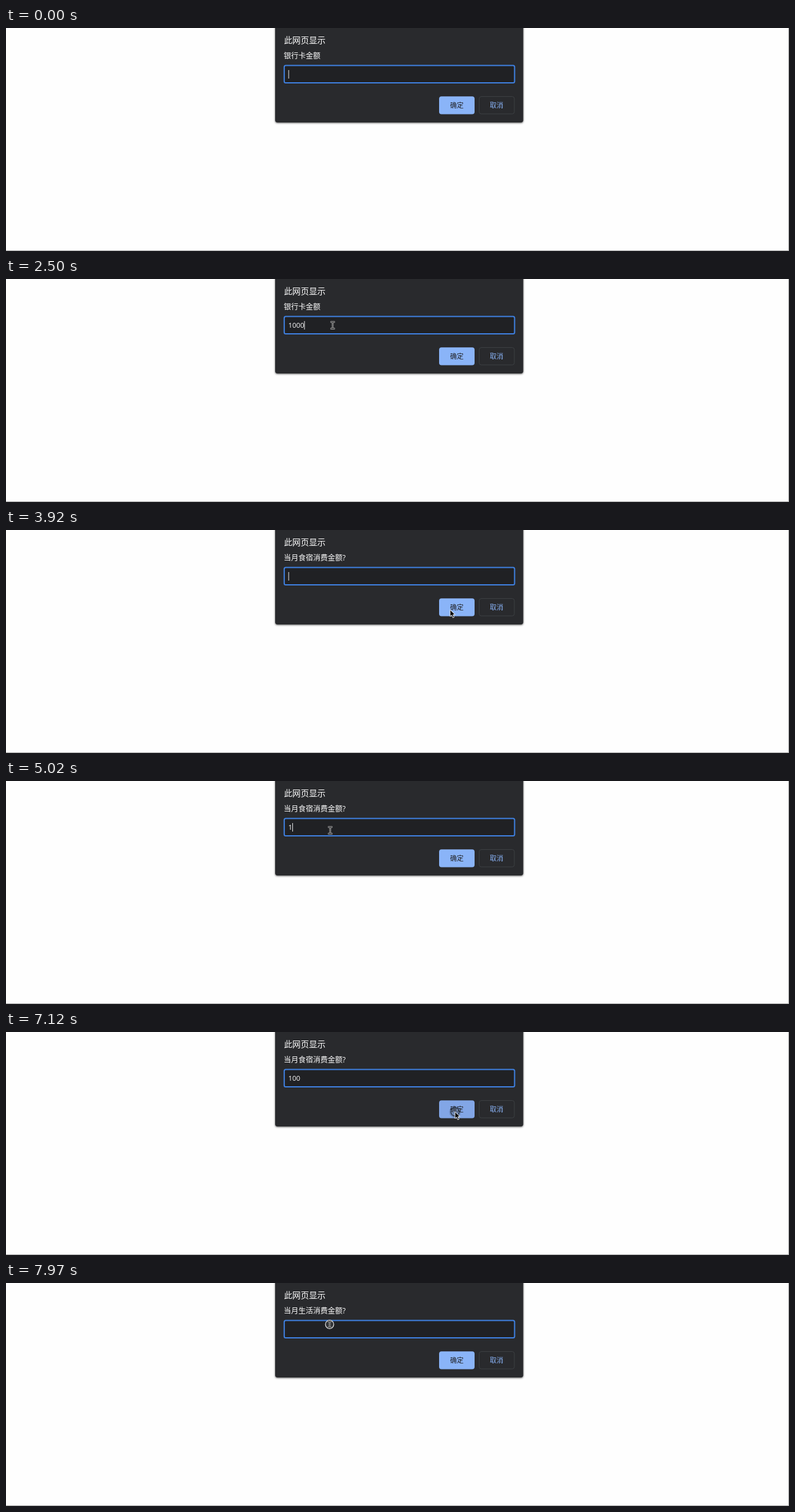
An HTML page that plays this animation: 1280x366 px, repeating every 8 s.

```html
<!DOCTYPE html>
<html lang="zh-CN">
<head>
<meta charset="utf-8">
<title>Prompt dialog</title>
<style>
html, body { margin: 0; width: 100%; height: 100%; overflow: hidden; background: #fefefe; }
#stage { position: relative; width: 1280px; height: 366px; overflow: hidden; }
#edge { position: absolute; inset: 0; border: solid #a3a3a3; border-width: 0 1px 1px 0; }
svg { position: absolute; left: 0; top: 0; width: 1280px; height: 366px; }
#dialog { transform-origin: 642.75px 0; }
text { font-family: "Open Sans", "Noto Sans CJK SC", "Noto Sans CJK", sans-serif; fill: #fff; font-size: 12px; white-space: pre; }
.btn { font-size: 11px; text-anchor: middle; }
#value { font-size: 11.3px; }
</style>
</head>
<body>
<div id="stage">
  <div id="edge"></div>
  <svg id="dialog" viewBox="0 0 1280 366">
    <rect x="440" y="-20" width="405.5" height="175" rx="4" fill="#292a2d" style="filter:drop-shadow(0 1px 1.5px rgba(0,0,0,.65))"/>
    <text x="454.5" y="25.2" style="font-size:13.6px">此网页显示</text>
    <text id="label" x="454" y="49.6"></text>
    <text id="ghost" x="454" y="49.6" opacity=".4"></text>
    <rect id="field" x="454.8" y="61.5" width="376.6" height="28.5" rx="2.5" fill="#202124" stroke="#3f80e0" stroke-width="2"/>
    <text id="value" x="461.6" y="80.2"></text>
    <rect id="caret" y="69" width="1" height="14" fill="#fff"/>
    <rect id="ok" x="708" y="112.2" width="58" height="29.2" rx="4"/>
    <text class="btn" x="737" y="131.2" style="fill:#202124">确定</text>
    <rect x="773.5" y="112.5" width="57.5" height="28.5" rx="3.5" fill="none" stroke="#3c4043"/>
    <text class="btn" x="802" y="131.2" style="fill:#8ab4f8">取消</text>
  </svg>
  <svg viewBox="0 0 1280 366">
    <g id="cursor">
      <g id="ring">
        <circle id="halo" r="9.5" fill="#000" fill-opacity=".18"/>
        <circle id="hoop" r="6.8" fill="#888" fill-opacity=".18" stroke-width="1.2"/>
      </g>
      <path id="arrow" d="M0 0V11L2.6 8.7L4.6 13L6.6 12.1L4.7 7.9H8.2Z" fill="#000" stroke="#fff" stroke-width=".9"/>
      <g id="beam" fill="none">
        <path d="M-3.5 -5.5H3.5M0 -5.5V5.5M-3.5 5.5H3.5" stroke="#c4c4c4" stroke-width="2.6"/>
        <path d="M-3 -5.5H3M0 -5.5V5.5M-3 5.5H3" stroke="#222" stroke-width="1"/>
      </g>
    </g>
  </svg>
</div>
<script>
const LOOP = 8000;
const el = id => document.getElementById(id);
const show = (id, on) => el(id).style.display = on ? '' : 'none';
const within = (t, a, b) => t >= a && t < b;

// Screen refreshes: first, last, count
const bursts = [
  [0, 270, 2], [550, 1480, 8], [1610, 1910, 3], [2210, 2500, 3], [2960, 3650, 6], [3770, 3920, 2],
  [4070, 5020, 8], [5290, 5440, 2], [5850, 6690, 7], [6970, 7120, 2], [7240, 7970, 6]
];
const ticks = bursts.flatMap(([a, b, n]) =>
  Array.from({ length: n }, (_, i) => Math.round((a + (b - a) * i / (n - 1)) / 10) * 10));
const refresh = t => ticks.filter(k => k <= t).pop();

// Pointer moves: start, end, target, optional bend
const moves = [
  { a: 550, b: 1480, to: [534, 76], bend: [620, -60] },
  { a: 2830, b: 3500, to: [726, 131] },
  { a: 3940, b: 4880, to: [530, 81] },
  { a: 5720, b: 6410, to: [737, 144] },
  { a: 6410, b: 6690, to: [734, 131] },
  { a: 7270, b: 7810, to: [529, 68] }
];

function pointer(t) {
  let from = [644, 288];
  for (const { a, b, to, bend } of moves) {
    if (t < a) break;
    const u = Math.min(1, (t - a) / (b - a));
    const e = u * u * (3 - 2 * u);
    const mid = bend || from.map((v, i) => (v + to[i]) / 2);
    from = from.map((v, i) => v * (1 - e) ** 2 + 2 * mid[i] * e * (1 - e) + to[i] * e * e);
  }
  return from;
}

const labels = ['银行卡金额', '当月食宿消费金额?', '当月生活消费金额?'];
// Field contents; each entry restarts the caret blink
const entries = [
  [-230, ''], [1910, '1'], [2210, '10'], [2350, '100'], [2500, '1000'],
  [3770, ''], [5020, '1'], [5290, '10'], [5440, '100'], [7240, '']
];
const clicks = [[1610, 1760], [3650, 3770], [7120, 7240], [7970, 8000]];

function draw(now) {
  const t = refresh(now % LOOP);
  const page = t < 3770 ? 0 : t < 7240 ? 1 : 2;
  const first = within(t, 3770, 3910), second = within(t, 7240, 7380);
  const swap = first || second;
  const [start, typed] = entries.filter(e => e[0] <= t).pop();

  el('dialog').style.opacity = swap ? .87 : 1;
  el('dialog').style.transform = second ? 'translateY(-9px) perspective(1000px) rotateX(5deg)'
    : first ? 'translateY(-9px)' : 'none';
  el('label').textContent = labels[swap ? page - 1 : page];
  el('ghost').textContent = swap ? labels[page] : '';
  el('field').setAttribute('stroke', swap ? '#3f66aa' : '#3f80e0');
  el('value').textContent = first ? '1000' : second ? '100' : typed;
  el('value').style.opacity = swap ? .6 : 1;
  el('caret').setAttribute('x', 461.6 + 6.46 * typed.length);
  el('caret').style.opacity = swap ? .5 : .9;
  show('caret', Math.floor((t - start) / 500) % 2 === 0);

  const [x, y] = pointer(t);
  const inField = within(x, 454, 832) && within(y, 61, 90);
  const onOk = within(x, 708, 766) && within(y, 112, 142);
  const hit = clicks.some(([a, b]) => within(t, a, b));
  el('ok').setAttribute('fill', onOk && typed ? '#82a6e6' : '#8ab4f8');
  el('cursor').setAttribute('transform', `translate(${x.toFixed(1)} ${y.toFixed(1)})`);
  show('cursor', t >= 550);
  show('arrow', !inField);
  show('beam', inField);
  show('ring', hit);
  show('halo', hit && page === 1);
  el('hoop').setAttribute('stroke', inField ? '#e4e4e4' : '#26303f');
}

const begin = performance.now();
function loop() {
  draw(performance.now() - begin);
  requestAnimationFrame(loop);
}
loop();
</script>
</body>
</html>
```
